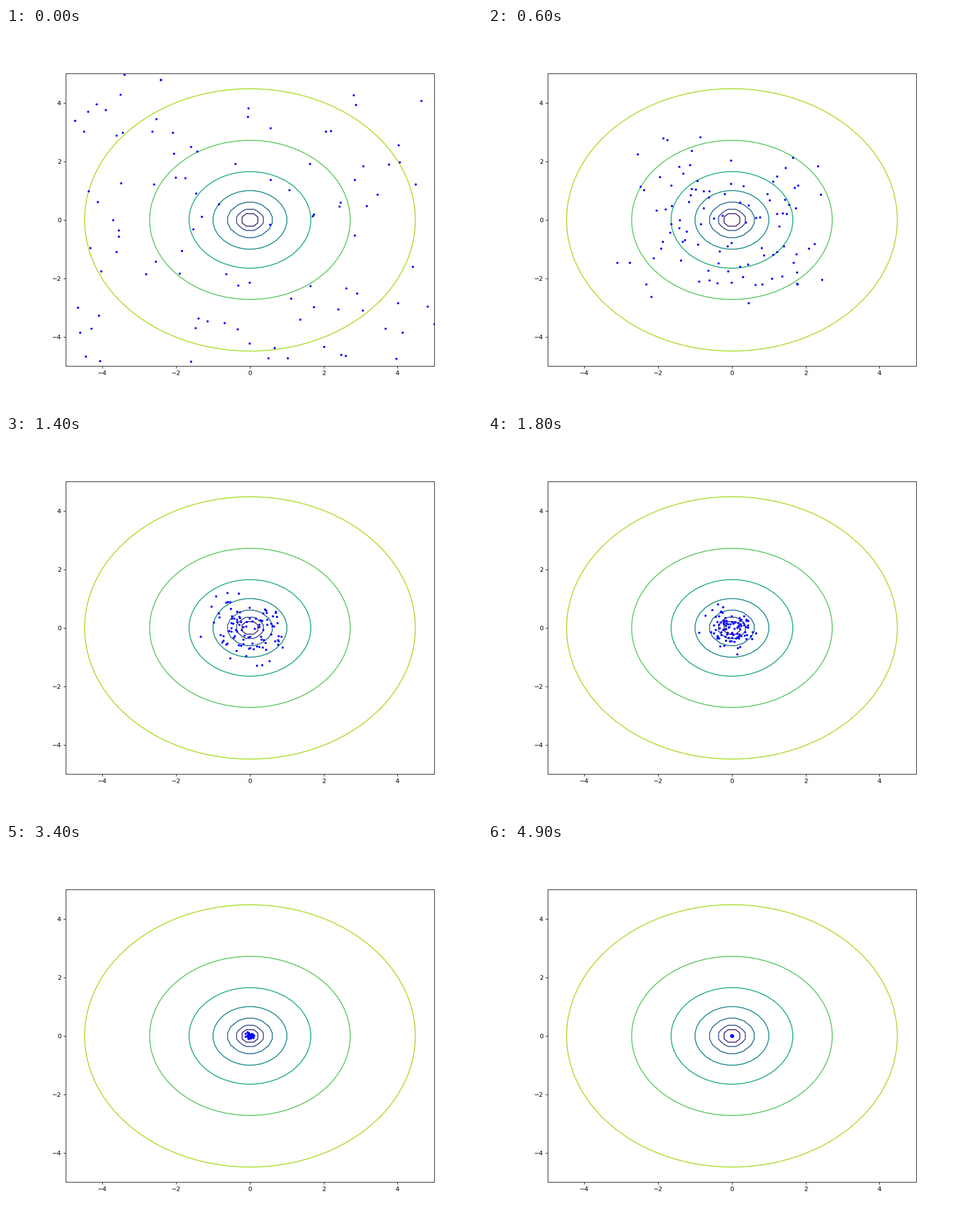
Animation of 837x669 px, one loop 5 s. Source, as a matplotlib script:

```python
import numpy as np
import matplotlib.pyplot as plt
from matplotlib.animation import FuncAnimation

FRAMES, INTERVAL = 50, 100
COUNT, LIMIT = 100, 5
DPI = 80

rng = np.random.default_rng(11)

# Each step pulls every coordinate a random fraction of the way to the optimum.
start = rng.uniform(-LIMIT, LIMIT, (COUNT, 2))
pace = rng.uniform(0.22, 0.26, (COUNT, 1))
shrink = 1 - pace * rng.random((FRAMES, COUNT, 2))
shrink[0] = 1
paths = start * np.cumprod(shrink, axis=0)

# The small surplus keeps the pixel size from rounding down.
fig, ax = plt.subplots(figsize=(837.001 / DPI, 669.001 / DPI), dpi=DPI)
axis = np.linspace(-LIMIT, LIMIT, 50)
gx, gy = np.meshgrid(axis, axis)
ax.contour(gx, gy, np.log(gx**2 + gy**2), levels=np.arange(-4, 5),
           cmap="viridis", linestyles="solid")
swarm, = ax.plot([], [], "o", color="blue", markersize=2.5)
ax.set(xlim=(-LIMIT, LIMIT), ylim=(-LIMIT, LIMIT))


def update(frame):
    swarm.set_data(*paths[frame].T)
    return swarm,


anim = FuncAnimation(fig, update, frames=FRAMES, interval=INTERVAL,
                     repeat=True, repeat_delay=0)
plt.show()
```
